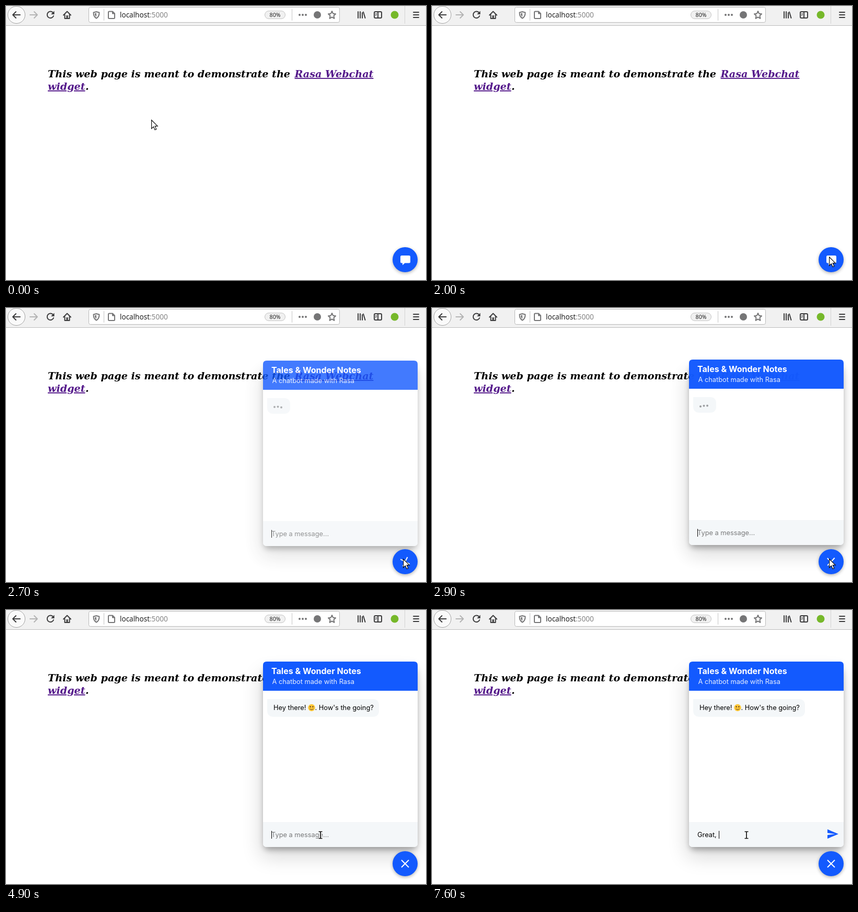
Write an HTML page that moves like this. It is 804 px wide and 526 px high and loops after 8 s.

```html
<!DOCTYPE html>
<html lang="en">
<head>
<meta charset="utf-8">
<title>Chat widget demo</title>
<style>
html, body { margin: 0; width: 100%; height: 100%; overflow: hidden; background: #fff; }
svg { display: block; }
.line { fill: none; stroke: #3c3c3d; stroke-width: 2; stroke-linecap: round; stroke-linejoin: round; }
.soft { stroke: #757576; }
.page { font: italic bold 19.15px "DejaVu Serif", serif; }
.link { fill: #551a8b; text-decoration: underline; }
.ui { font: 13.6px "Open Sans", "Noto Sans", sans-serif; }
.chat { font: 12.8px Inter, sans-serif; }
</style>
</head>
<body>
<svg width="804" height="526" viewBox="0 0 804 526" xml:space="preserve">
  <!-- browser bar -->
  <rect width="804" height="37" fill="#f1f1f1"/>
  <rect y="37" width="804" height="1" fill="#bcbcbc"/>
  <circle cx="20" cy="17" r="16.5" fill="#fafafa" stroke="#a3a3a3"/>
  <path class="line" d="M13 17H27M19 11L13 17L19 23"/>
  <path class="line" style="stroke:#b4b4b4" d="M46 17H60M54 11L60 17L54 23"/>
  <path class="line" d="M90.500 13.500A6.300 6.300 0 1 0 91 19"/>
  <path d="M92.500 9.500V16H86Z" fill="#3c3c3d"/>
  <path class="line" d="M110 17.500L117 10.500L124 17.500M112.500 17V24H121.500V17"/>
  <rect x="115.500" y="18" width="3" height="6" fill="#3c3c3d"/>
  <rect x="158.500" y="2.500" width="480" height="29" rx="3" fill="#fff" stroke="#b9b9b9"/>
  <path class="line soft" d="M173 11L178.500 12.500C178.500 18 177 21.500 173 23.500C169 21.500 167.500 18 167.500 12.500Z"/>
  <path d="M173 13.500V21C171 19.500 170 17.500 170 14.300Z" fill="#757576"/>
  <path d="M187.500 6V28M547.500 6V28" stroke="#c4c4c4"/>
  <path class="line soft" d="M204 10.500H197.500Q196 10.500 196 12V22.500Q196 24 197.500 24H206.500Q208 24 208 22.500V14.500ZV14.500H208"/>
  <text class="ui" x="218" y="22" fill="#111">localhost</text>
  <text class="ui" x="275" y="22" fill="#7c7c7c">:5000</text>
  <rect x="495.500" y="9.500" width="39" height="15" rx="7.500" fill="#f1f1f1" stroke="#c4c4c4"/>
  <text class="ui" x="515" y="21" style="font-size:10.600px" text-anchor="middle" fill="#111">80%</text>
  <g fill="#757576">
    <circle cx="562" cy="17" r="2"/><circle cx="568" cy="17" r="2"/><circle cx="574" cy="17" r="2"/>
    <circle cx="596" cy="17" r="7"/>
  </g>
  <path class="line soft" d="M624 10L626.200 14.700L631 15.300L627.400 18.700L628.400 24L624 21.300L619.600 24L620.600 18.700L617 15.300L621.800 14.700Z"/>
  <path class="line" d="M674 11V23M678 11V23M682 13V23M684 11.500L687.500 23"/>
  <rect class="line" x="705" y="11" width="14" height="12" rx="2"/>
  <path class="line" d="M712 11V23"/>
  <path d="M707 14.500H710M707 16.500H710M707 18.500H709" stroke="#3c3c3d"/>
  <circle cx="744" cy="17" r="7.500" fill="#76b82a"/>
  <path d="M763.500 0V34" stroke="#d2d2d2"/>
  <path class="line" d="M780 12H790M780 17H790M780 22H790"/>

  <!-- page -->
  <g class="page">
    <text x="80" y="137">This web page is meant to demonstrate the</text>
    <text x="552.500" y="137" class="link">Rasa Webchat</text>
    <text x="80" y="161" class="link">widget</text>
    <text x="152" y="161">.</text>
  </g>

  <!-- chat panel -->
  <g id="panel" class="chat">
    <rect x="488" y="122" width="296" height="352" rx="8" opacity=".15" style="filter:blur(19px)"/>
    <rect x="494" y="112" width="292" height="348" rx="8" opacity=".32" style="filter:blur(6px)"/>
    <rect x="492" y="99" width="296" height="356" rx="7" fill="#fff"/>
    <path d="M492 155V106Q492 99 499 99H781Q788 99 788 106V155Z" fill="#135afe"/>
    <path d="M492 407V448Q492 455 499 455H781Q788 455 788 448V407Z" fill="#f4f7f9"/>
    <text x="508" y="123" fill="#fff" style="font-size:16px;font-weight:700">Tales &amp; Wonder Notes</text>
    <text x="509.500" y="142" fill="#fff" fill-opacity=".9">A chatbot made with Rasa</text>
    <path id="bubble" fill="#f4f7f9"/>
    <g id="dots" fill="#9b9da0"><circle cx="514" r="2"/><circle cx="520.500" r="2"/><circle cx="527" r="2"/></g>
    <g id="hello">
      <text x="512" y="192">Hey there!</text>
      <circle cx="585" cy="187.500" r="6.700" fill="#fcc737"/>
      <circle cx="582.600" cy="185.800" r="1.200" fill="#5b3a22"/>
      <circle cx="587.400" cy="185.800" r="1.200" fill="#5b3a22"/>
      <path d="M581.500 189.500Q585 193 588.500 189.500" fill="none" stroke="#5b3a22"/>
      <text x="591.500" y="192">. How's the going?</text>
    </g>
    <text id="hint" x="508" y="436" fill="#78797a">Type a message...</text>
    <text id="typed" x="508" y="436"></text>
    <rect id="caret" y="424" width="1" height="15"/>
    <path id="send" transform="translate(755 418)" d="M2 21L23 12L2 3V10L17 12L2 14Z" fill="#135afe"/>
  </g>

  <!-- launcher -->
  <circle cx="764" cy="489" r="24" opacity=".3" style="filter:blur(3px)"/>
  <circle cx="764" cy="487" r="24" fill="#135afe"/>
  <path id="talk" d="M757.500 479H771.500Q774 479 774 481.500V491Q774 493.500 771.500 493.500H763.500L759 497.500V493.500H757.500Q755 493.500 755 491V481.500Q755 479 757.500 479Z" fill="#fff"/>
  <path id="cross" d="M757 480L771 494M771 480L757 494" stroke="#fff" stroke-width="2"/>

  <!-- pointers -->
  <path id="arrow" d="M.6 1V17.300L4.400 13.800L7 19.800L9.800 18.600L7.200 12.700H12.200Z" fill="#fff" stroke="#111" stroke-width="1.200"/>
  <g id="beam" fill="none">
    <path d="M-3.500 -6.500H3.500M-3.500 6.500H3.500M0 -6.500V6.500" stroke="#fff" stroke-width="3.400"/>
    <path d="M-3.500 -6.500H3.500M-3.500 6.500H3.500M0 -6.500V6.500" stroke="#111" stroke-width="1.700"/>
  </g>
</svg>
<script>
const LOOP = 8000, STEP = 100, OPEN = 2500, REPLY = 3300, TYPE = 5900;
const el = id => document.getElementById(id);
const show = (id, on) => el(id).setAttribute('opacity', +on);
const move = (id, x, y) => el(id).setAttribute('transform', `translate(${x} ${y})`);
const clamp = v => Math.min(1, Math.max(0, v));
const latest = (keys, t) => keys.filter(k => k[0] <= t).pop();

// time, x, y, text pointer
const pointer = [
  [0, 278, 218], [500, 325, 250], [600, 425, 314], [700, 501, 358],
  [1100, 626, 396], [1200, 676, 423],
  [1500, 688, 433], [1600, 707, 448], [1700, 727, 462], [1800, 743, 472], [1900, 754, 478], [2000, 760, 481],
  [4300, 748, 472], [4400, 722, 456], [4500, 676, 437, 1], [4600, 640, 427, 1],
  [4700, 619, 426, 1], [4800, 607, 430, 1], [4900, 602, 432, 1]
];
// time, text, caret x
const typing = [
  [0, '', 508], [TYPE, 'G', 517], [6100, 'Gr', 522], [6300, 'Gre', 530],
  [6500, 'Great', 541], [7400, 'Great,', 545], [7600, 'Great, ', 549]
];
const caretOn = [[2500, 3000], [3500, 3700], [4300, 7200], [7400, 8000]];

// cubic-bezier(.25, .1, .25, 1)
function ease(t) {
  const curve = (s, a, b) => 3 * s * (1 - s) ** 2 * a + 3 * s * s * (1 - s) * b + s ** 3;
  let lo = 0, hi = 1;
  for (let i = 0; i < 24; i++) {
    const mid = (lo + hi) / 2;
    if (curve(mid, .25, .25) < t) lo = mid; else hi = mid;
  }
  return curve(lo, .1, 1);
}

function bubblePath(w, h, r) {
  const x = 500 + w, y = 171 + h;
  return `M500 171H${x - r}Q${x} 171 ${x} ${171 + r}V${y - r}Q${x} ${y} ${x - r} ${y}` +
    `H${500 + r}Q500 ${y} 500 ${y - r}Z`;
}

function draw(t) {
  const open = t >= OPEN, replied = t >= REPLY;
  const p = open ? ease(clamp((t - 2367) / 667)) : 0;

  show('panel', p);
  move('panel', 0, Math.round(8 * (1 - p)));
  show('talk', !open);
  show('cross', open);
  el('cross').setAttribute('transform', `rotate(${-90 * (1 - p)} 764 487)`);

  el('bubble').setAttribute('d', replied ? bubblePath(214, 34, 12) : bubblePath(44, 30, 12));
  show('dots', !replied);
  [...el('dots').children].forEach((dot, i) =>
    dot.setAttribute('cy', 189 - 1.5 * Math.max(0, Math.sin((t - 2200) / 207 - i * 1.1))));
  show('hello', clamp((t - REPLY + 100) / 300));

  const [, text, x] = latest(typing, t);
  el('typed').textContent = text;
  show('hint', !text);
  el('caret').setAttribute('x', x);
  show('caret', caretOn.some(([a, b]) => t >= a && t < b));
  show('send', clamp((t - TYPE + 100) / 300));

  const [, px, py, beam] = latest(pointer, t);
  const cursor = beam ? 'beam' : 'arrow';
  show('arrow', !beam);
  show('beam', !!beam);
  move(cursor, px, py);
}

const start = performance.now();
function tick() {
  const t = (performance.now() - start) % LOOP;
  draw(Math.floor(t / STEP) * STEP);
  requestAnimationFrame(tick);
}
tick();
</script>
</body>
</html>
```
